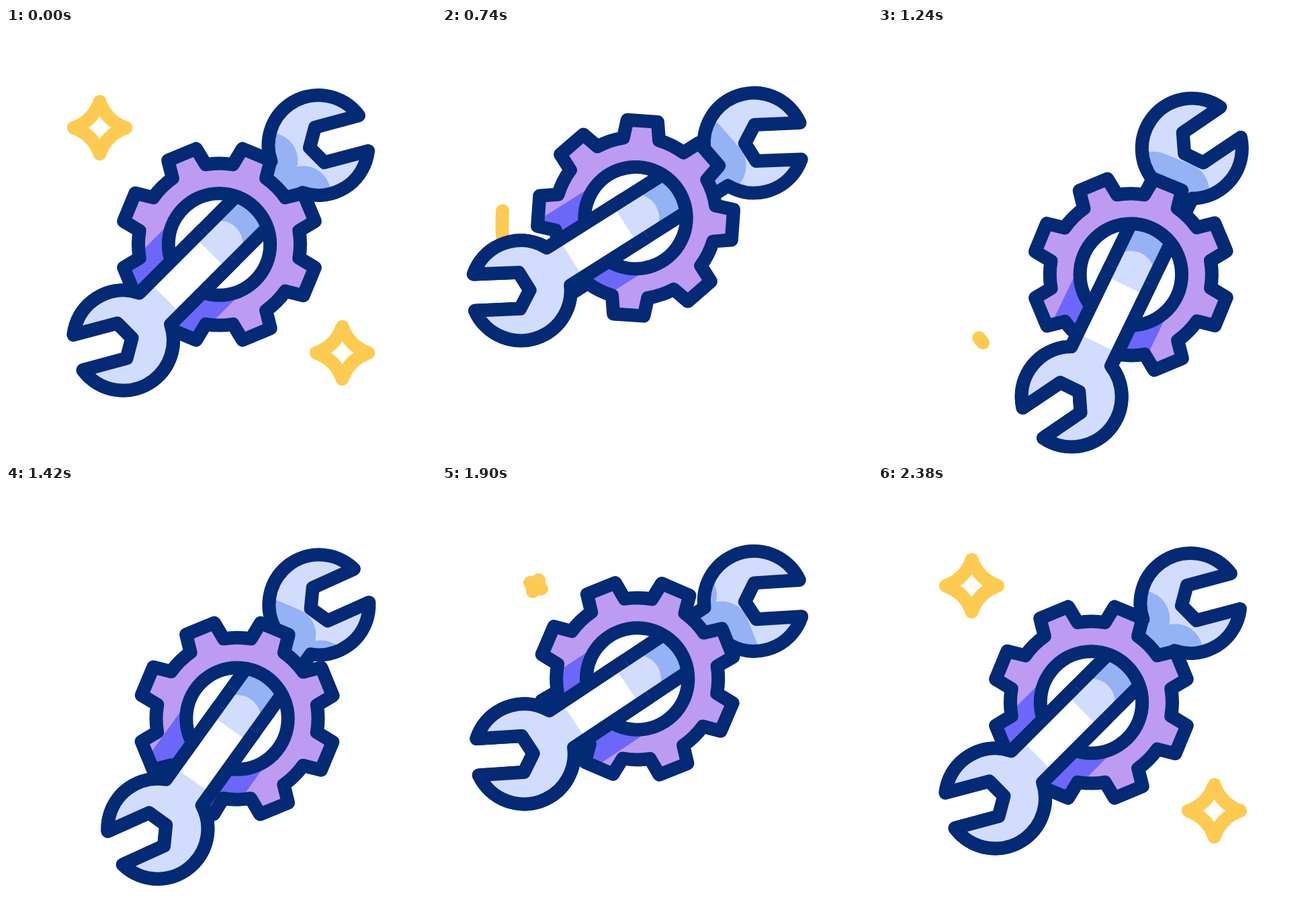
Animation of 640 by 640 pixels, one loop 2.4 s. Source, as an HTML page with a canvas:

```html
<!DOCTYPE html>
<html lang="en">
<head>
<meta charset="utf-8">
<title>Wrench and gear</title>
<style>
html, body { margin: 0; height: 100%; overflow: hidden; background: #fff; }
canvas { display: block; }
</style>
</head>
<body>
<canvas id="stage" width="640" height="640"></canvas>
<script>
const ctx = document.getElementById('stage').getContext('2d');
const LOOP = 2400;
const NAVY = '#032a75', PALE = '#d2dcfd', BLUE = '#94b2f4';
const LILAC = '#bd9bf3', VIOLET = '#6c67f9', YELLOW = '#fdcb50';
const PIVOT = [480, 170], CENTER = [319.75, 319.75], GEAR_X = -3.2;
const rad = deg => deg * Math.PI / 180;

// Cubic bezier easing with control points (x1, 0) and (x2, 1)
function ease(p, x1 = 0.55, x2 = 0.45) {
  let lo = 0, hi = 1;
  for (let i = 0; i < 24; i++) {
    const s = (lo + hi) / 2;
    const x = 3 * x1 * s * (1 - s) ** 2 + 3 * x2 * s * s * (1 - s) + s ** 3;
    if (x < p) lo = s; else hi = s;
  }
  return lo * lo * (3 - 2 * lo);
}

// Keys are [time, value] pairs; values hold outside the range
function track(keys, t, x1, x2) {
  if (t <= keys[0][0]) return keys[0][1];
  for (let i = 1; i < keys.length; i++) {
    const [t0, v0] = keys[i - 1], [t1, v1] = keys[i];
    if (t < t1) return v0 + (v1 - v0) * ease((t - t0) / (t1 - t0), x1, x2);
  }
  return keys[keys.length - 1][1];
}

const swing = [[0, 0], [500, 17.7], [585, 17.7], [1116, -19.2], [1222, -19.2], [1716, 14.3], [2250, 0]];
const gearTurn = [[0, 0], [1290, 90], [1900, 90.7], [2390, 90]];
const arcEnd = [[560, -4], [1050, 41.2]];
const arcStart = [[880, -4], [1320, 41.2]];
const stars = [
  { x: 139.5, y: 148.5,
    size: [[0, 1], [280, 1.6], [560, 0], [1808, 0], [2088, 1.36], [2350, 1]],
    turn: [[0, 0], [560, -88], [1807, -88], [1808, 29], [2350, 0]] },
  { x: 500.5, y: 483.5,
    size: [[187, 1], [467, 1.6], [740, 0], [1940, 0], [2215, 1.36], [2380, 1]],
    turn: [[187, 0], [747, -88], [1939, -88], [1940, 29], [2380, 0]] }
];

function makeWrench() {
  const path = new Path2D();
  for (const base of [0, 180]) {
    const cx = -205.4 * Math.cos(rad(base)), axis = rad(base + 210);
    const arc = (from, to) => path.arc(cx, 0, 74.5, rad(base + from), rad(base + to), true);
    arc(333.7, 231.4);
    for (const [a, b] of [[2, 27], [-13.5, 0], [2, -27]]) {
      path.lineTo(cx + a * Math.cos(axis) - b * Math.sin(axis),
                  a * Math.sin(axis) + b * Math.cos(axis));
    }
    arc(188.6, 26.3);
  }
  path.closePath();
  return path;
}

function makeGear() {
  const path = new Path2D();
  for (let i = 0; i < 8; i++) {
    const mid = 22.5 + 45 * i;
    const point = deg => path.lineTo(146.5 * Math.cos(rad(deg)), 146.5 * Math.sin(rad(deg)));
    point(mid - 8.9);
    point(mid + 8.9);
    path.arc(0, 0, 120.5, rad(mid + 12.8), rad(mid + 32.2));
  }
  path.closePath();
  path.moveTo(75.7, 0);
  path.arc(0, 0, 75.7, 0, 2 * Math.PI);
  path.closePath();
  return path;
}

const wrench = makeWrench(), gear = makeGear();

function group(draw) {
  ctx.save();
  draw();
  ctx.restore();
}

function stroke(path, color, width = 20) {
  ctx.strokeStyle = color;
  ctx.lineWidth = width;
  ctx.stroke(path);
}

function clipRect(x, width) {
  ctx.beginPath();
  ctx.rect(x, -400, width, 800);
  ctx.clip();
}

function drawWrench(toGear) {
  ctx.fillStyle = PALE;
  ctx.fill(wrench);
  ctx.fillStyle = '#fff';
  ctx.fillRect(-116.5, -33, 95, 66);
  if (toGear) group(() => {
    ctx.clip(wrench);
    clipRect(GEAR_X, 400);
    toGear();
    stroke(gear, BLUE, 81);
  });
  stroke(wrench, NAVY);
}

function drawTool(t) {
  const angle = track(swing, t);
  const turn = track(gearTurn, t, 0.26, 0.39);
  const spin = rad(turn - angle + 45);
  const toGear = () => {
    ctx.translate(GEAR_X, 0);
    ctx.rotate(spin);
  };
  ctx.translate(...PIVOT);
  ctx.rotate(rad(angle));
  ctx.translate(CENTER[0] - PIVOT[0], CENTER[1] - PIVOT[1]);
  ctx.rotate(rad(-45));

  drawWrench(toGear);
  group(() => {
    toGear();
    ctx.fillStyle = LILAC;
    ctx.fill(gear, 'evenodd');
    ctx.clip(gear, 'evenodd');
    ctx.rotate(-spin);
    ctx.fillStyle = VIOLET;
    ctx.fillRect(-200, -74.5, 200, 149);
  });
  group(() => {
    toGear();
    stroke(gear, NAVY);
  });
  // The lower half of the wrench passes in front of the gear
  clipRect(-400, 400 + GEAR_X);
  drawWrench();
}

function drawArc(t) {
  const from = track(arcStart, t), to = track(arcEnd, t);
  if (to - from < 0.1) return;
  const path = new Path2D();
  path.arc(359, 291, 269.5, rad(180 - from), rad(180 - to), true);
  stroke(path, YELLOW);
}

function drawStar({ x, y, size, turn }, t) {
  const scale = track(size, t);
  if (scale < 0.01) return;
  const path = new Path2D(), tip = 38.7 * scale, c = 10 * scale;
  path.moveTo(0, -tip);
  path.quadraticCurveTo(c, -c, tip, 0);
  path.quadraticCurveTo(c, c, 0, tip);
  path.quadraticCurveTo(-c, c, -tip, 0);
  path.quadraticCurveTo(-c, -c, 0, -tip);
  path.closePath();
  ctx.translate(x, y);
  ctx.rotate(rad(track(turn, t)));
  stroke(path, YELLOW);
}

function frame(now) {
  const t = now % LOOP;
  ctx.clearRect(0, 0, 640, 640);
  ctx.lineCap = ctx.lineJoin = 'round';
  drawArc(t);
  for (const star of stars) group(() => drawStar(star, t));
  group(() => drawTool(t));
  requestAnimationFrame(frame);
}
requestAnimationFrame(frame);
</script>
</body>
</html>
```
